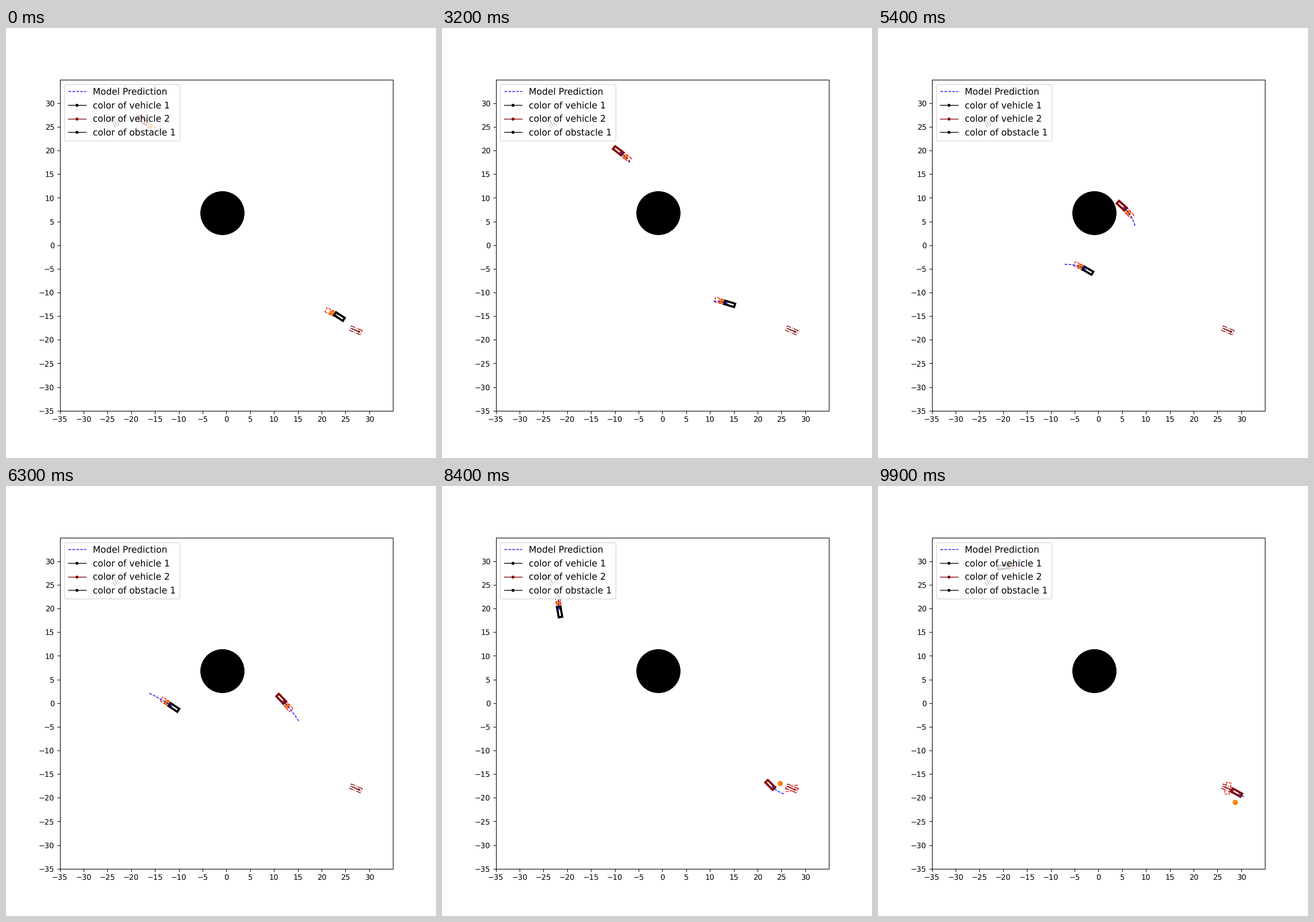
Recreate the animation shown at these times as a matplotlib script. Size 748 by 748 pixels, loop 10000 ms.

```python
import numpy as np
import matplotlib.pyplot as plt
from matplotlib.animation import FuncAnimation
from matplotlib.lines import Line2D

FRAMES = 100
STEP_MS = 100
BODY = (2.2, 0.75)
GHOST = (2.48, 0.98)
AHEAD = 1.95
LEAD = 3
GOAL_1 = np.array([-23.53, 26.22])
GOAL_2 = np.array([27.19, -18.02])
WAYPOINTS = np.array([0, 16, 32, 54, 71, 84, 92, 99])
K = np.arange(FRAMES)

plt.rcParams["text.hinting"] = "none"


def smooth(values):
    """Cubic curve through values at the waypoints, one sample per frame."""
    t, v = WAYPOINTS, np.array(values, float)
    m = np.gradient(v, t, edge_order=2)
    i = np.clip(np.searchsorted(t, K, side="right") - 1, 0, len(t) - 2)
    h = t[i + 1] - t[i]
    s = (K - t[i]) / h
    return ((2 * s**3 - 3 * s**2 + 1) * v[i] + (s**3 - 2 * s**2 + s) * h * m[i]
            + (3 * s**2 - 2 * s**3) * v[i + 1] + (s**3 - s**2) * h * m[i + 1])


def bump(center, width):
    return np.exp(-((K - center) / width) ** 2)


def unit(deg):
    a = np.radians(deg)
    return np.array([np.cos(a), np.sin(a)]).T


def box(center, deg, size):
    u = unit(deg)
    n = np.array([-u[1], u[0]])
    a, b = u * size[0] / 2, n * size[1] / 2
    return np.array([center + a + b, center - a + b,
                     center - a - b, center + a - b])


def outline(color, lw, style="-", z=2):
    return ax.add_patch(plt.Polygon(np.zeros((4, 2)), fill=False, ec=color,
                                    lw=lw, ls=style, zorder=z))


def draw_goal(center, deg, color):
    outline(color, 1, "-.").set_xy(box(center, deg, GHOST))
    u = unit(deg)
    ax.arrow(*(center - u), *(1.6 * u), width=0.12, head_width=0.45,
             head_length=0.4, color=color, lw=0.6)


class Vehicle:
    def __init__(self, color, x, y, heading, side):
        self.pos = np.column_stack([smooth(x), smooth(y)])
        self.heading = smooth(heading)
        self.speed = np.hypot(*np.gradient(self.pos, axis=0).T)
        # Passing the obstacle, then a shared swerve, then a correction.
        self.turn = (side * 45 * bump(46, 14) - 105 * bump(71, 4)
                     - side * 28 * bump(84, 4))
        soon = np.minimum(K + LEAD, FRAMES - 1)
        self.aim = self.heading[soon] + 0.1 * self.turn
        self.ref = self.pos + AHEAD * unit(self.aim)
        self.dot = self.ref.copy()
        self.dot_art, = ax.plot([], [], "o", color="C1", ms=6, zorder=2.5)
        self.ref_art = outline("red", 1, "--", 2.6)
        self.body_art = outline(color, 2.8, z=2.7)
        self.plan_art, = ax.plot([], [], "b--", lw=1, zorder=2.8)

    def plan(self, k):
        bend = (np.arange(5) + 0.5) / 5
        steps = 0.98 * self.speed[k] * unit(self.heading[k] + self.turn[k] * bend)
        start = self.pos[k] + 0.4 * unit(self.heading[k])
        return start + np.vstack([[0, 0], np.cumsum(steps, axis=0)])

    def show(self, k):
        self.body_art.set_xy(box(self.pos[k], self.heading[k], BODY))
        self.ref_art.set_xy(box(self.ref[k], self.aim[k], GHOST))
        self.dot_art.set_data(*self.dot[k:k + 1].T)
        self.plan_art.set_data(*self.plan(k).T)


fig, ax = plt.subplots(figsize=(8, 8), dpi=93.5)
ax.set(xlim=(-35, 35), ylim=(-35, 35),
       xticks=range(-35, 35, 5), yticks=range(-35, 35, 5))
ax.add_patch(plt.Circle((-0.83, 6.77), 4.64, color="black", lw=0))
draw_goal(GOAL_1, 118, "black")
draw_goal(GOAL_2, -23, "maroon")

first = Vehicle(
    "black", side=1,
    x=[23.75, 21.52, 14.13, -2.21, -17.67, -21.59, -23.5, -19.96],
    y=[-15.1, -14.22, -12.41, -5.38, 4.77, 19.29, 26.1, 28.77],
    heading=[147, 167, 163, 150, 137, 100, 92, 8])
second = Vehicle(
    "maroon", side=-1,
    x=[-17.61, -15.62, -9.28, 4.91, 16.87, 22.66, 26.8, 29.06],
    y=[26.4, 24.5, 19.96, 8.35, -6.23, -17.29, -19.1, -18.93],
    heading=[-38, -38, -37, -42, -49, -45, -25, -29])

# Close to its goal the second reference snaps there and spins,
# while its dot drifts past.
near = K >= 82
drift = 1 - np.exp(-np.clip(K[near] - 84, 0, None) / 2)
second.ref[near] = GOAL_2
second.aim[near] = 11 + 4.5 * (K[near] - 84)
second.dot[near] = (24.66, -16.93) + np.outer(drift, (3.98, -4.01))


def entry(color, label, **style):
    return Line2D([], [], color=color, lw=1, label=label, **style)


ax.legend(handles=[
    entry("blue", "Model Prediction", ls="--"),
    entry("black", "color of vehicle 1", marker="."),
    entry("maroon", "color of vehicle 2", marker="."),
    entry("black", "color of obstacle 1", marker="."),
], loc="upper left", fontsize=12, labelspacing=0.52)


def update(k):
    first.show(k)
    second.show(k)
    return []


anim = FuncAnimation(fig, update, frames=FRAMES, interval=STEP_MS,
                     repeat=True, repeat_delay=0)
plt.show()
```
